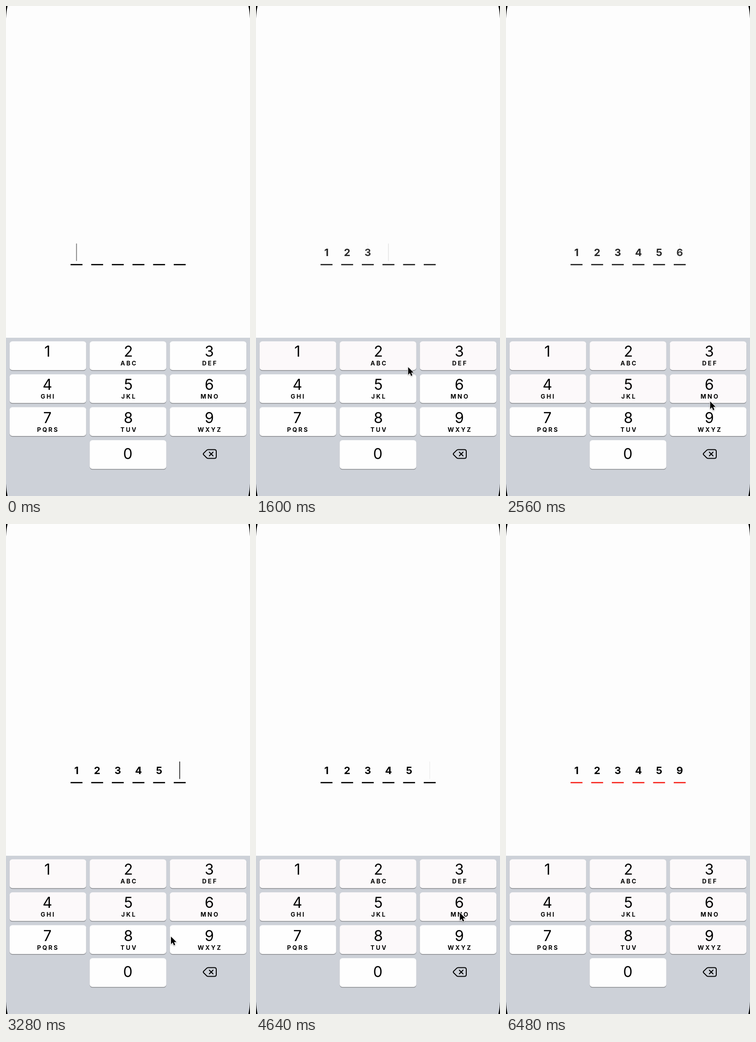
These frames come from a looping animation (528x1062 px, 7520 ms). An HTML page:

```html
<!DOCTYPE html>
<html lang="en">
<head>
<meta charset="utf-8">
<title>Code entry</title>
<style>
  html, body { margin: 0; width: 100%; height: 100%; overflow: hidden; background: #fdfdfd; }
  svg { display: block; width: 100%; height: 100%; font-family: Inter, Roboto, sans-serif; text-anchor: middle; }
  .num { font-size: 32px; }
  .letters { font-size: 13px; font-weight: 700; letter-spacing: 3px; }
  .digit { font-size: 22px; font-weight: 700; }
  #pointer { filter: drop-shadow(0 1px 1px rgba(0, 0, 0, .3)); }
</style>
</head>
<body>
<svg viewBox="0 0 528 1062" xmlns="http://www.w3.org/2000/svg">
  <defs><path id="corner" d="M0 0H3.4Q.8 11 0 27Z"/></defs>
  <rect width="528" height="1062" fill="#fdfdfd"/>
  <g id="before"></g>
  <g id="after"></g>
  <rect y="719" width="528" height="343" fill="#cdd1d8"/>
  <g id="keys"></g>
  <g stroke="#000" stroke-width="2" stroke-linejoin="round" stroke-linecap="round">
    <path id="eraseBody" d="M427.3 972.3Q426.3 971 427.3 969.7L434.2 962.9Q435.6 961.6 437.5 961.6H451Q455 961.6 455 965.6V976.6Q455 980.6 451 980.6H437.5Q435.6 980.6 434.2 979.2Z"/>
    <path id="eraseCross" d="M440 967L448 975M448 967L440 975"/>
  </g>
  <use href="#corner"/>
  <use href="#corner" transform="translate(528) scale(-1 1)"/>
  <use href="#corner" transform="translate(0 1062) scale(1 -1)"/>
  <use href="#corner" transform="translate(528 1062) scale(-1)"/>
  <path id="pointer" d="M0 0V16.5L3.8 12.8L6.3 19L9.1 17.9L6.6 11.8H11.8Z" stroke="#fff" stroke-width="2" stroke-linejoin="round" paint-order="stroke"/>
</svg>
<script>
const LOOP = 7520, STEP = 80, HOLD = 2 * STEP;
const TRAVEL = 560, ENTER = 160, LEAVE = 6400;
const $ = id => document.getElementById(id);

// When each key goes down; "<" erases.
const taps = [
  ['1', 720], ['2', 1040], ['3', 1440], ['4', 1760], ['5', 2080], ['6', 2400],
  ['<', 2800], ['8', 3520], ['<', 4080], ['6', 4720], ['<', 5360], ['9', 5840]
];
// Where the pointer rests on each key.
const spots = {
  1: [122, 764], 2: [183, 775], 3: [392, 772], 4: [150, 813], 5: [291, 813],
  6: [441, 835], 8: [335, 874], 9: [431, 893], '<': [446, 976]
};
const entrance = [4, 994];

// Digits land one step after the key goes down, erasing is immediate.
const edits = [{ time: -LOOP, code: '' }];
for (const [key, down] of taps) {
  const { code } = edits.at(-1);
  edits.push(key === '<'
    ? { time: down, code: code.slice(0, -1) }
    : { time: down + STEP, code: code + key });
}

const letters = ['', '', 'ABC', 'DEF', 'GHI', 'JKL', 'MNO', 'PQRS', 'TUV', 'WXYZ'];

function keyMarkup(n) {
  const slot = n ? n - 1 : 10;
  const col = slot % 3, row = Math.floor(slot / 3);
  const x = 7.8 + col * 173.35, y = 726.8 + row * 71.4;
  const mid = 89.5 + col * 175.2 - (n ? 0 : 1);
  const textY = 760.3 + row * 72;
  const box = (top, attrs) => `<rect x="${x}" y="${top}" width="165.7" height="62.4" rx="6" ${attrs}/>`;
  return box(y + 1.5, 'fill="#898b8f"') + box(y, `id="key${n}"`) +
    `<text class="num" x="${mid}" y="${n ? textY : 982}">${n}</text>` +
    `<text class="letters" x="${mid + 1.5}" y="${textY + 18.5}">${letters[n]}</text>`;
}
$('keys').innerHTML = letters.map((_, n) => keyMarkup(n)).join('');

function fieldMarkup(code, time) {
  const wrong = code.length === 6 && !code.endsWith('6');
  const blink = .5 + .5 * Math.cos((time - 220) / 1000 * 2 * Math.PI);
  let out = '';
  for (let i = 0; i < 6; i++) {
    const x = 152.6 + i * 44.66;
    out += `<rect x="${x - 12.9}" y="559.2" width="25.8" height="2.7" fill="${wrong ? '#f7261f' : '#000'}"/>`;
    if (i < code.length) out += `<text class="digit" x="${x}" y="542">${code[i]}</text>`;
    if (i === code.length) out += `<rect x="${x - .8}" y="514.8" width="1.5" height="37.8" opacity="${blink}"/>`;
  }
  return out;
}

// Each edit crossfades the whole field.
function drawField(time) {
  const index = edits.findLastIndex(e => e.time <= time);
  const { time: start, code } = edits[index];
  const mix = Math.min(1, .35 + (time - start) / 180);
  $('after').innerHTML = fieldMarkup(code, time);
  $('after').setAttribute('opacity', mix);
  $('before').innerHTML = mix < 1 ? fieldMarkup(edits[index - 1].code, time) : '';
  $('before').setAttribute('opacity', 1 - mix);
}

function drawKeys(time) {
  const fills = Array(10).fill('#fefefe');
  let erasing = false;
  for (const [key, down] of taps) {
    if (time < down) break;
    const held = time < down + HOLD;
    if (key === '<') erasing = held;
    else fills[key] = held ? '#b3becd' : '#fcf9fa';
  }
  fills.forEach((fill, n) => $('key' + n).setAttribute('fill', fill));
  $('eraseBody').setAttribute('fill', erasing ? '#000' : 'none');
  $('eraseCross').setAttribute('stroke', erasing ? '#e4e6ea' : '#000');
}

// The pointer sets off as soon as a tap lands and eases to the next key.
function drawPointer(time) {
  const shown = time >= ENTER && time < LEAVE;
  $('pointer').setAttribute('visibility', shown ? 'visible' : 'hidden');
  if (!shown) return;
  const last = taps.findLastIndex(([, down]) => down + STEP <= time);
  const from = last < 0 ? entrance : spots[taps[last][0]];
  const start = last < 0 ? ENTER : taps[last][1] + STEP;
  const [key, down] = taps[last + 1] ?? taps[last];
  const p = Math.min(1, Math.max(0, (time - start) / Math.min(TRAVEL, Math.abs(down - start))));
  const ease = p * p * (3 - 2 * p);
  const [x, y] = from.map((v, i) => v + (spots[key][i] - v) * ease);
  $('pointer').setAttribute('transform', `translate(${x} ${y})`);
}

let shownTime = -1;
function tick() {
  const time = Math.floor(performance.now() % LOOP / STEP) * STEP;
  if (time !== shownTime) {
    shownTime = time;
    drawField(time);
    drawKeys(time);
    drawPointer(time);
  }
  requestAnimationFrame(tick);
}
tick();
</script>
</body>
</html>
```
